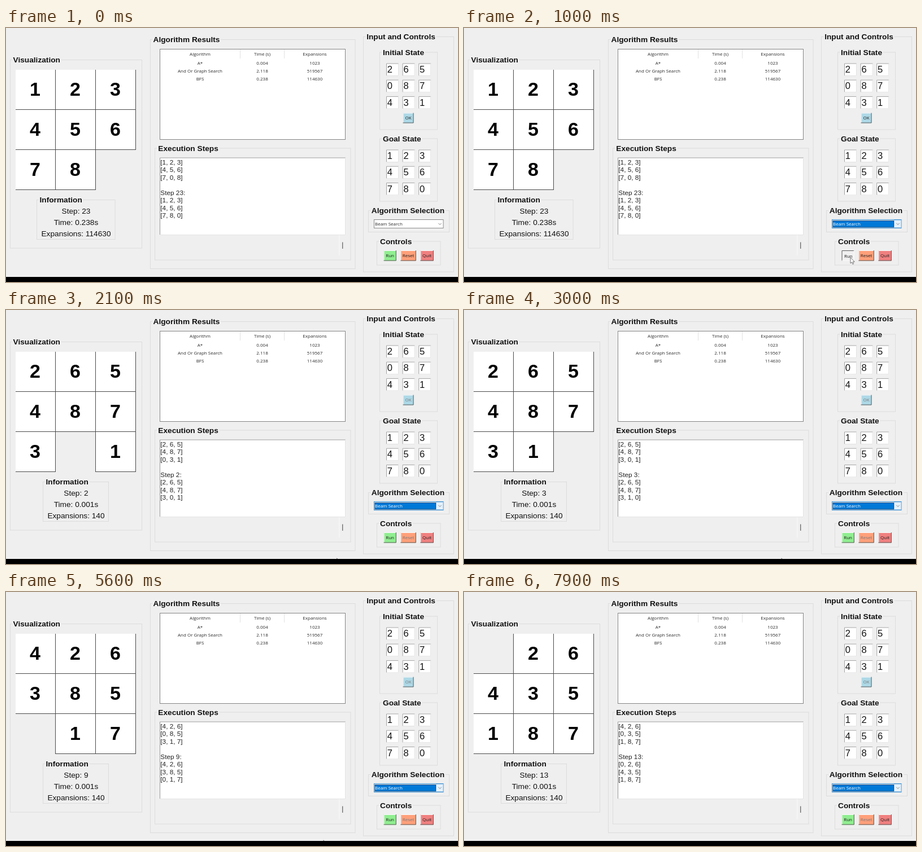
Write an HTML page that moves like this. It is 800x450 px and loops after 8000 ms.

```html
<!DOCTYPE html>
<html lang="en">
<head>
<meta charset="utf-8">
<title>8-puzzle solver</title>
<style>
  html, body { margin: 0; width: 100%; height: 100%; overflow: hidden; background: #efefef; }
  svg { display: block; width: 800px; height: 450px; }
  text { font-family: "Liberation Sans", Arial, sans-serif; fill: #111; white-space: pre; }
  .title { font-size: 13.7px; font-weight: bold; }
  .info { font-size: 13.7px; text-anchor: middle; }
  .tile { font-size: 34px; font-weight: bold; text-anchor: middle; fill: #000; }
  .log { font-size: 11.8px; fill: #222; }
  .entry { font-size: 16.5px; }
  .ui { font-family: "Open Sans", "Noto Sans", sans-serif; font-size: 8px; fill: #2a2a2a; }
  .mid { text-anchor: middle; }
</style>
</head>
<body>
<svg id="stage" viewBox="0 0 800 450">
  <clipPath id="board-clip"><rect x="17" y="74" width="213" height="213"/></clipPath>
</svg>
<script>
const LOOP = 8000, TICK = 100, FIRST_TICK = 11, TICKS_PER_STEP = 5;
const BG = '#efefef';
const stage = document.getElementById('stage');

function add(tag, attrs, parent = stage) {
  const el = document.createElementNS('http://www.w3.org/2000/svg', tag);
  for (const k in attrs) el.setAttribute(k, attrs[k]);
  parent.appendChild(el);
  return el;
}
function set(el, attrs) {
  for (const k in attrs) el.setAttribute(k, attrs[k]);
}
function box(x, y, x2, y2, fill, stroke = 'none', parent) {
  return add('rect', { x, y, width: x2 - x, height: y2 - y, fill, stroke }, parent);
}
function label(cls, x, y, str, parent) {
  const el = add('text', { class: cls, x, y }, parent);
  el.textContent = str;
  return el;
}
function line(d, stroke, width = 1, parent) {
  return add('path', { d, stroke, 'stroke-width': width, fill: 'none' }, parent);
}
function show(el, on) { el.style.display = on ? '' : 'none'; }

// A labelled frame whose title sits on the top edge.
function frame(x, y, x2, y2, title, titleX) {
  const border = box(x, y, x2, y2, 'none', '#dcdcdc');
  const gap = box(titleX - 2, y - 6, titleX, y + 7, BG);
  const text = label('title', titleX, y + 4.9, title);
  gap.setAttribute('width', text.getComputedTextLength() + 4);
  return { border, gap, text };
}

function button(x, y, x2, y2, fill, str) {
  const face = box(x, y, x2, y2, fill);
  const lit = line(`M${x + .5} ${y2}V${y + .5}H${x2}`, '#fafafa');
  const shade = line(`M${x} ${y2 - .5}H${x2 - .5}V${y}`, '#5c5c5c');
  const text = label('ui mid', (x + x2) / 2, (y + y2) / 2 + 2.9, str);
  return {
    enable(on) { text.style.fill = on ? '#1c1c1c' : '#77777a'; },
    press(on) {
      face.setAttribute('fill', on ? '#f0f0f0' : fill);
      lit.setAttribute('stroke', on ? '#5c5c5c' : '#fafafa');
      shade.setAttribute('stroke', on ? '#fafafa' : '#5c5c5c');
      text.setAttribute('transform', on ? 'translate(.7 .7)' : '');
    }
  };
}

function entries(y, digits) {
  [...digits].forEach((d, i) => {
    const x = 673 + (i % 3) * 28.6, top = y + Math.floor(i / 3) * 29.2;
    box(x, top, x + 22, top + 22.5, '#fff');
    line(`M${x + .5} ${top + 22}V${top + .5}H${x + 22}`, '#a2a2a2');
    line(`M${x} ${top + 22}H${x + 21.5}V${top}`, '#e2e2e2');
    label('entry', x + 1.8, top + 16.6, d);
  });
}

// Left panel
frame(7.5, 56.5, 240.5, 390, 'Visualization', 12.5);
const board = add('g', { 'clip-path': 'url(#board-clip)' });
const tiles = Array.from({ length: 9 }, (_, i) => {
  const x = 16.5 + (i % 3) * 71, y = 73.5 + Math.floor(i / 3) * 71;
  const g = add('g', {}, board);
  box(x, y, x + 71, y + 71, '#fff', '#4a4a4a', g);
  return { g, text: label('tile', x + 35, y + 46.8, '', g) };
});
const info = frame(54.5, 304.5, 193, 374.5, 'Information', 59.5);
const infoLines = [329, 348.7, 368.7].map(y => label('info', 124, y, ''));

// Middle panel
frame(255.5, 20.5, 618, 426.5, 'Algorithm Results', 260.5);
box(272.5, 37.5, 600.5, 197.5, '#fff', '#858585');
line('M414.5 38V54M492.5 38V54', '#e2e2e2');
[
  ['Algorithm', 'Time (s)', 'Expansions'],
  ['A*', '0.004', '1023'],
  ['And Or Graph Search', '2.118', '519567'],
  ['BFS', '0.238', '114630']
].forEach((row, r) => row.forEach((cell, c) =>
  label('ui mid', [343.5, 453.5, 546.5][c], [49, 64.5, 79, 93.1][r], cell)));

frame(263.5, 213, 610, 411, 'Execution Steps', 269.3);
box(272, 229.5, 601, 367, '#fff');
line('M272.5 367V230H601', '#9a9a9a');
line('M272 366.5H600.5V230', '#e4e4e4');
const logLines = Array.from({ length: 8 }, (_, i) => label('log', 273.3, 241.9 + i * 13.45, ''));
const slimBar = add('g', {});
line('M590 367V403', '#fafafa', 1, slimBar);
line('M595.7 379.5V391', '#666', 1.3, slimBar);
const arrows = add('path', { d: 'M592.5 375.5h6l-3-4zM592.5 396h6l-3 4z', fill: '#a0a0a0' });

// Right panel
frame(632.5, 15.5, 792.5, 432, 'Input and Controls', 638.2);
frame(661.5, 43, 763.5, 180, 'Initial State', 667);
entries(62.5, '265087431');
const ok = button(702.5, 150.5, 721.5, 168.5, '#add8e6', 'OK');
frame(661.5, 196, 763.5, 307, 'Goal State', 667);
entries(215.5, '123456780');
frame(641.5, 323.5, 784.5, 361.5, 'Algorithm Selection', 646.8);
const combo = box(651.5, 339.5, 774, 354.5, '#fff', '#8a8a8a');
const mark = box(653, 341.5, 760.5, 353, '#0078d7', '#1a4f80');
const choice = label('ui', 653, 350, 'Beam Search');
const drop = box(761.5, 340.5, 773.5, 353.5, '#e5f1fb', '#a9cdea');
line('M765.3 345.8l2.7 2.7l2.7-2.7', '#777', .9);
frame(656.5, 378, 769, 420, 'Controls', 662);
const run = button(668.5, 394, 690.8, 412.5, '#90ee90', 'Run');
const reset = button(698.3, 394, 725.8, 412.5, '#ffa07a', 'Reset');
button(733.3, 394, 756.8, 412.5, '#f08080', 'Quit').enable(true);
run.enable(true);

const cursor = add('path', {
  d: 'M0 0V10.5L2.4 8.3L4 12L5.7 11.2L4.1 7.7H7.3Z',
  fill: '#fff', stroke: '#555', 'stroke-width': .8
});
box(0, 441, 800, 450, '#000');

// Boards follow from the path of the blank cell.
const blanks = [3, 6, 7, 8, 5, 2, 1, 0, 3, 6, 7, 4, 3, 0];
const boards = [[...'265087431']];
for (let i = 1; i < blanks.length; i++) {
  const b = [...boards[i - 1]];
  b[blanks[i - 1]] = b[blanks[i]];
  b[blanks[i]] = '0';
  boards.push(b);
}
const rows = b => [0, 3, 6].map(i => `[${b.slice(i, i + 3).join(', ')}]`);

function drawState(step, cells, before, time, expansions) {
  tiles.forEach((t, i) => {
    show(t.g, cells[i] !== '0');
    t.text.textContent = cells[i];
  });
  [`Step: ${step}`, `Time: ${time}s`, `Expansions: ${expansions}`]
    .forEach((s, i) => infoLines[i].textContent = s);
  const head = before ? [...rows(before), ''] : [];
  const log = [...head, `Step ${step}:`, ...rows(cells)];
  logLines.forEach((l, i) => l.textContent = log[i] || '');
  show(slimBar, before);
  show(arrows, !before);
}

function resizeInfo(x, x2) {
  set(info.border, { x, width: x2 - x });
  info.gap.setAttribute('x', x + 3);
  info.text.setAttribute('x', x + 5);
}

// Pointer stops: time, x, y of the tip
const pointer = [
  [200, 706, 372], [700, 684, 406.5], [1100, 684, 406.5],
  [1400, 595, 439.8], [1900, 595, 439.8], [2600, 562, 439.8], [7300, 562, 439.8]
];
function movePointer(t) {
  const i = pointer.findIndex(p => p[0] > t);
  show(cursor, i > 0);
  if (i < 1) return;
  const [t0, x0, y0] = pointer[i - 1], [t1, x1, y1] = pointer[i];
  const k = (t - t0) / (t1 - t0);
  cursor.setAttribute('transform', `translate(${x0 + (x1 - x0) * k} ${y0 + (y1 - y0) * k})`);
}

function draw(tick) {
  const solving = tick >= FIRST_TICK;
  if (solving) {
    const n = Math.min(Math.floor((tick - FIRST_TICK) / TICKS_PER_STEP), boards.length - 1);
    drawState(n, boards[n], boards[n - 1], '0.001', 140);
    resizeInfo(65.5, 181.5);
  } else {
    drawState(23, [...'123456780'], [...'123456708'], '0.238', 114630);
    resizeInfo(54.5, 193);
  }
  ok.enable(!solving);
  reset.enable(!solving);
  run.press(tick >= 9 && !solving);

  const focused = tick >= 1;
  show(mark, focused);
  show(drop, focused);
  combo.setAttribute('stroke', focused ? '#3c8fd0' : '#8a8a8a');
  choice.style.fill = focused ? '#fff' : '#2a2a2a';
  movePointer(tick * TICK);
}

let last = -1;
function play() {
  const tick = Math.floor(((performance.now() + 5) % LOOP) / TICK);
  if (tick !== last) draw(last = tick);
  requestAnimationFrame(play);
}
play();
</script>
</body>
</html>
```
